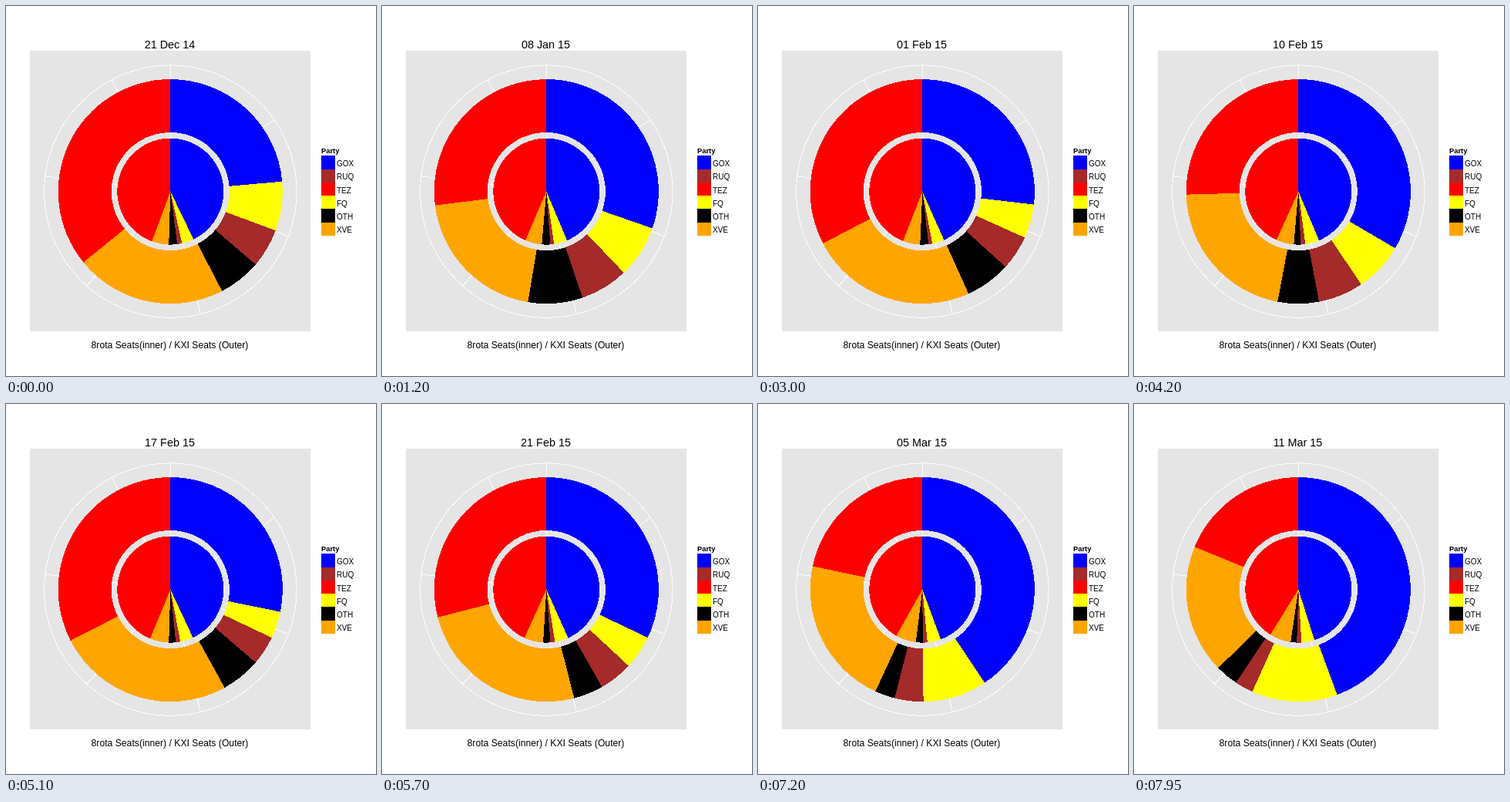
An HTML page that plays this animation: 480 by 480 pixels, repeating every 8 s.

```html
<!DOCTYPE html>
<html lang="en">
<head>
<meta charset="utf-8">
<title>Seat forecast</title>
<style>
  html, body { margin: 0; width: 100%; height: 100%; overflow: hidden; background: #fff; }
  svg { display: block; width: 100vw; height: 100vh; }
  text { font-family: "Liberation Sans", Arial, sans-serif; font-size: 10px; }
</style>
</head>
<body>
<svg id="stage" viewBox="0 0 480 480">
  <rect x="31" y="58" width="364" height="364" fill="#e5e5e5"/>
  <g id="grid" fill="none" stroke="#fff" shape-rendering="crispEdges"></g>
  <g id="pies" shape-rendering="crispEdges"></g>
  <text id="date" x="212.5" y="55" text-anchor="middle" style="font-size:14.4px"></text>
  <text x="212.5" y="444" text-anchor="middle" style="font-size:12.2px">8rota Seats(inner) / KXI Seats (Outer)</text>
  <g id="legend"><text x="409" y="191" font-weight="bold" style="font-size:9.4px">Party</text></g>
</svg>
<script>
const CX = 213.3, CY = 240.6, STEP = 150, LOOP = 8000;
const INNER = [0, 69], OUTER = [76.6, 145.6], RIM = 163.8;
const SEATS = 650;

const legend = [
  ["GOX", "#0000ff"], ["RUQ", "#a52a2a"], ["TEZ", "#ff0000"],
  ["FQ", "#ffff00"], ["OTH", "#000000"], ["XVE", "#ffa500"]
];
// Clockwise order of the slices, as legend rows
const order = [0, 3, 1, 4, 5, 2];

// Step, days since 21 Dec 2014, then slice ends in degrees
const keys = [
  { step: 0, day: 0, inner: [154.2, 167.4, 172.6, 181.7, 200.3], outer: [84.9, 110.4, 130.6, 152.6, 230.8] },
  { step: 8, day: 18, inner: [157.1, 171.7, 175.8, 185, 203.2], outer: [109.2, 136.4, 161.2, 189.5, 262.9] },
  { step: 20, day: 42, inner: [156, 169.2, 173.4, 182.5, 201.3], outer: [96.7, 114.3, 132.2, 155.7, 242.4] },
  { step: 28, day: 51, inner: [157.1, 172.5, 177.5, 185, 204.3], outer: [120.4, 145.9, 169.4, 190.7, 268.4] },
  { step: 34, day: 58, inner: [154.9, 169.2, 174.2, 181.7, 202.4], outer: [101.5, 115.5, 130.6, 151.1, 242.9] },
  { step: 43, day: 68, inner: [157.1, 172.5, 177.5, 185.8, 206.9], outer: [132.8, 154.7, 174.9, 183.9, 271.6] },
  { step: 53, day: 80, inner: [162.4, 176.7, 181.7, 188.4, 211.8], outer: [159.8, 204.3, 213.8, 225.6, 292.3] }
];

const byId = id => document.getElementById(id);

function add(parent, tag, attrs, text) {
  const el = document.createElementNS("http://www.w3.org/2000/svg", tag);
  for (const name in attrs) el.setAttribute(name, attrs[name]);
  if (text) el.textContent = text;
  parent.appendChild(el);
  return el;
}

function polar(r, deg) {
  const a = deg * Math.PI / 180;
  return (CX + r * Math.sin(a)).toFixed(2) + " " + (CY - r * Math.cos(a)).toFixed(2);
}

function slice([r0, r1], from, to) {
  const big = to - from > 180 ? 1 : 0;
  return `M${polar(r0, from)}L${polar(r1, from)}A${r1} ${r1} 0 ${big} 1 ${polar(r1, to)}` +
    `L${polar(r0, to)}` + (r0 ? `A${r0} ${r0} 0 ${big} 0 ${polar(r0, from)}Z` : "Z");
}

const grid = byId("grid");
add(grid, "circle", { cx: CX, cy: CY, r: RIM });
for (let s = 0; s < SEATS; s += 100) {
  add(grid, "path", { d: `M${CX} ${CY}L${polar(RIM, s / SEATS * 360)}` });
}

legend.forEach(([name, fill], i) => {
  const y = 194.3 + i * 17.28;
  add(byId("legend"), "rect", { x: 409, y, width: 18, height: 17.28, fill, "shape-rendering": "crispEdges" });
  add(byId("legend"), "text", { x: 429, y: y + 13.7 }, name);
});

const makePie = () => order.map(i => add(byId("pies"), "path", { fill: legend[i][1] }));
const innerPie = makePie(), outerPie = makePie();

function drawPie(paths, radii, ends) {
  paths.forEach((path, i) => {
    path.setAttribute("d", slice(radii, i ? ends[i - 1] : 0, i < ends.length ? ends[i] : 360));
  });
}

const months = { 0: "Jan", 1: "Feb", 2: "Mar", 11: "Dec" };

function dateText(day) {
  const d = new Date(Date.UTC(2014, 11, 21 + day));
  return `${String(d.getUTCDate()).padStart(2, "0")} ${months[d.getUTCMonth()]} ${d.getUTCFullYear() % 100}`;
}

function draw(time) {
  const step = Math.floor(time % LOOP / STEP);
  const next = Math.max(1, keys.findIndex(k => k.step >= step));
  const a = keys[next - 1], b = keys[next];
  const p = (step - a.step) / (b.step - a.step);
  const mix = (u, v) => u + (v - u) * p;
  const mixAll = ring => a[ring].map((u, i) => mix(u, b[ring][i]));

  drawPie(innerPie, INNER, mixAll("inner"));
  drawPie(outerPie, OUTER, mixAll("outer"));
  byId("date").textContent = dateText(Math.round(mix(a.day, b.day)));
}

const start = performance.now();
function tick() {
  draw(performance.now() - start);
  requestAnimationFrame(tick);
}
tick();
</script>
</body>
</html>
```
